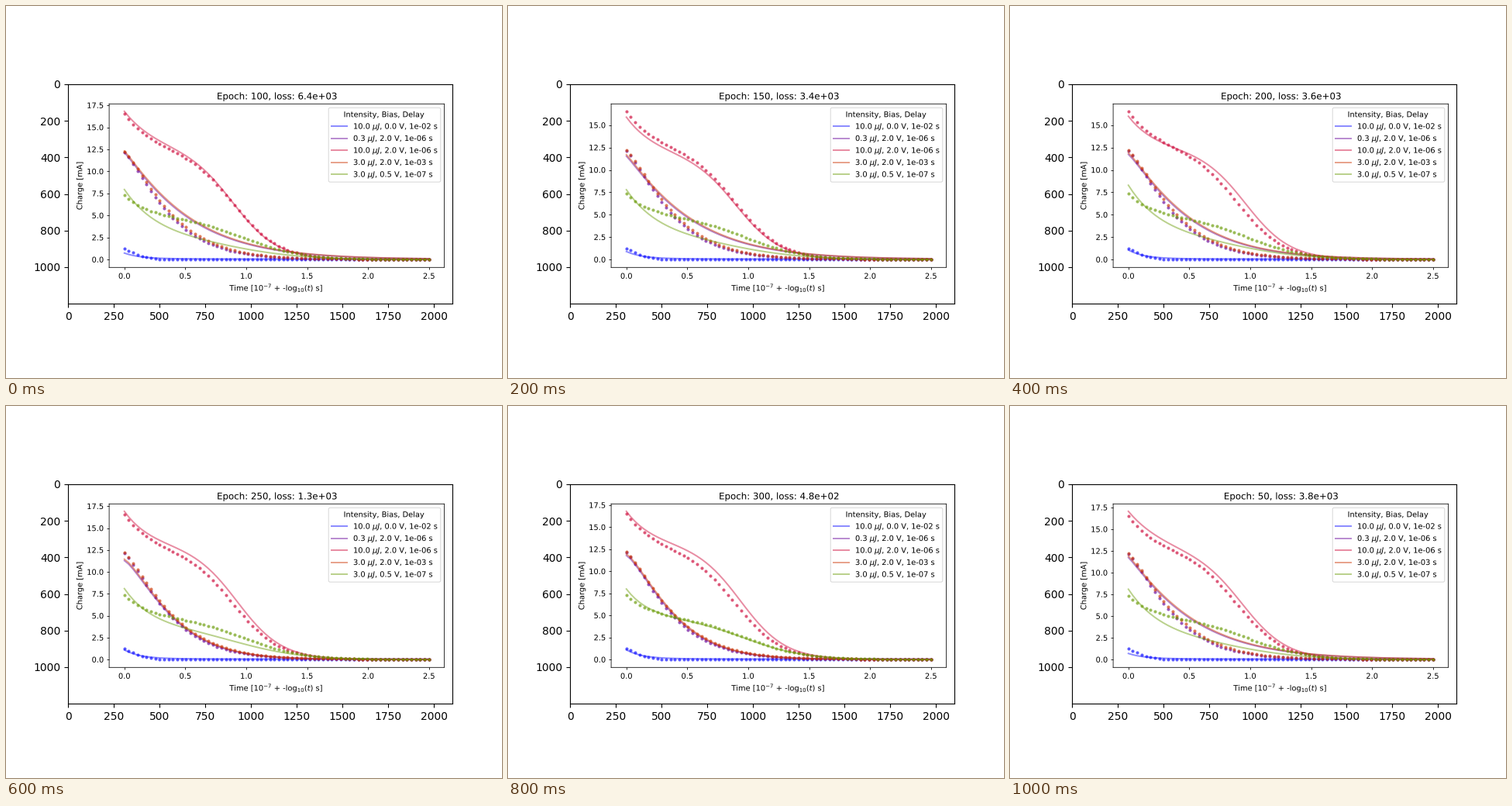
Write a matplotlib script that moves like this. It is 640x480 px and loops after 1200 ms.

```python
import numpy as np
import matplotlib.pyplot as plt
from matplotlib.animation import FuncAnimation
from matplotlib.patches import FancyBboxPatch
from matplotlib.patheffects import Normal
from matplotlib.transforms import Affine2D

W, H, DPI = 640, 480, 100
K = 496 / 700                      # scale of the inner chart: 7 inches over 496 px
LEFT, RIGHT, TOP, BOTTOM = 133.1, 565.4, 126.3, 337.3
SERIES = ["10.0 $\\mu J$, 0.0 V, 1e-02 s", "0.3 $\\mu J$, 2.0 V, 1e-06 s",
          "10.0 $\\mu J$, 2.0 V, 1e-06 s", "3.0 $\\mu J$, 2.0 V, 1e-03 s",
          "3.0 $\\mu J$, 0.5 V, 1e-07 s"]
COLORS = [(0, 0, 1), (.4, 0, .6), (.8, 0, .2), (.8, .2, 0), (.4, .6, 0)]
T = np.linspace(0, 2.5, 70)

# epoch, loss, then start of the crimson curve, its shelf and knee,
# and the starts of the purple and green curves
STEPS = [(100, "6.4e+03", 16.82, 12.5, .895, 12.1, 7.95),
         (150, "3.4e+03", 15.9, 11.8, .905, 11.5, 7.8),
         (200, "3.6e+03", 16.0, 12.3, .965, 11.7, 8.3),
         (250, "1.3e+03", 16.92, 13.0, .93, 11.25, 8.1),
         (300, "4.8e+02", 16.8, 13.1, .94, 11.75, 8.0),
         (50, "3.8e+03", 17.06, 12.2, .94, 11.7, 8.1)]


def sigmoid(x):
    return 1 / (1 + np.exp(-x))


def stretched(start, tau, power):
    return start * np.exp(-(T / tau) ** power) + .04


def shelf_decay(start, shelf, knee, width, tau):
    """Fast first drop onto a shelf that falls away at the knee."""
    slope = shelf * sigmoid((knee - T) / width)
    return slope + (start - slope[0]) * np.exp(-T / tau)


# Measured points, the same at every epoch
DOTS = [stretched(1.2, .13, 1.3) - .07 * np.exp(-((T - .32) / .2) ** 2)
        + .015 * np.sin(9 * T),
        stretched(12.1, .415, 1.25),
        shelf_decay(16.55, 12.5, .895, .19, .22),
        stretched(12.2, .435, 1.25),
        shelf_decay(7.35, 4.9, .98, .24, .19)]


def fits(epoch, start, shelf, knee, steep, green):
    """Fitted curves, closer to the points as training goes on."""
    early = sigmoid((epoch - 150) / 22)
    mid = sigmoid((epoch - 215) / 12)
    late = sigmoid((epoch - 250) / 18)
    tau, power = .55 - .11 * mid, 1.1 + .22 * mid
    return [stretched(.6 + .4 * early, .13, 1) + .06 * np.exp(-T / 1.2),
            stretched(steep, tau, power),
            shelf_decay(start, shelf, knee, .183, .2 + .1 * np.exp((50 - epoch) / 80)),
            stretched(steep * 1.015, tau * 1.015, power),
            shelf_decay(green, 2.4 + 2.5 * late, .92 + .06 * late,
                        .3 - .06 * late, .28 - .1 * late)]


fig = plt.figure(figsize=(W / DPI, H / DPI), dpi=DPI)
frame_ax = fig.add_subplot()
frame_ax.set(xlim=(-.5, 2099.5), ylim=(1199.5, -.5), aspect="equal")
ax = fig.add_axes([LEFT / W, 1 - BOTTOM / H, (RIGHT - LEFT) / W, (BOTTOM - TOP) / H])
pixels = Affine2D().scale(1 / W, -1 / H).translate(0, 1) + fig.transFigure


def label(x, y, text, size=10, ha="center", **kw):
    ax.text(x, y, text, size=size * K, ha=ha, va="baseline", transform=pixels,
            path_effects=[Normal()], zorder=6, **kw)


def draw_legend():
    ax.add_patch(FancyBboxPatch(
        (418.2, 133.3), 140.6, 91.8, boxstyle="round,pad=2,rounding_size=2",
        transform=pixels, fc=(1, 1, 1, .8), ec=(.8, .8, .8, .8), lw=K,
        zorder=5, clip_on=False))
    label(488, 143.3, "Intensity, Bias, Delay")
    for i, (name, color) in enumerate(zip(SERIES, COLORS)):
        y = 155.2 + 15.5 * i
        ax.plot([420.3, 440], [y, y], color=color, alpha=.45, lw=2 * K,
                transform=pixels, zorder=6, solid_capstyle="projecting")
        label(448, y + 3.4, name, ha="left")


def draw(k):
    ax.clear()
    epoch, loss, *shape = STEPS[k]
    curves = fits(epoch, *shape)
    for dots, curve, color in zip(DOTS, curves, COLORS):
        ax.plot(T, dots, "o", color=color, alpha=.65, ms=2.95, mew=0)
        ax.plot(T, curve, color=color, alpha=.45, lw=2 * K)

    low, high = -.045, max(DOTS[2][0], curves[2][0])
    pad = .05 * (high - low)
    bottom, top = low - pad, high + pad
    yticks = [v for v in np.arange(0, 18, 2.5) if v < top]
    xticks = np.arange(0, 2.6, .5)
    ax.set(xlim=(-.125, 2.625), ylim=(bottom, top), xticks=xticks, yticks=yticks)
    ax.tick_params(length=3.5 * K, width=.8 * K, labelbottom=False, labelleft=False)
    for spine in ax.spines.values():
        spine.set(linewidth=.8 * K, snap=False)

    for v in yticks:
        y = BOTTOM - (v - bottom) / (top - bottom) * (BOTTOM - TOP)
        label(LEFT - 6.9, y + 3.6, f"{v:.1f}", ha="right")
    for v in xticks:
        label(LEFT + (v + .125) / 2.75 * (RIGHT - LEFT), 351.8, f"{v:.1f}")
    middle = (LEFT + RIGHT) / 2
    label(middle, TOP - 5.9, f"Epoch: {epoch}, loss: {loss}", size=12)
    label(middle, 367.4, r"Time [$10^{-7}$ + -log$_{10}(t)$ s]")
    label(98.3, (TOP + BOTTOM) / 2, "Charge [mA]", rotation=90, rotation_mode="anchor")
    draw_legend()


anim = FuncAnimation(fig, draw, frames=len(STEPS), interval=200, repeat=True)
plt.show()
```
